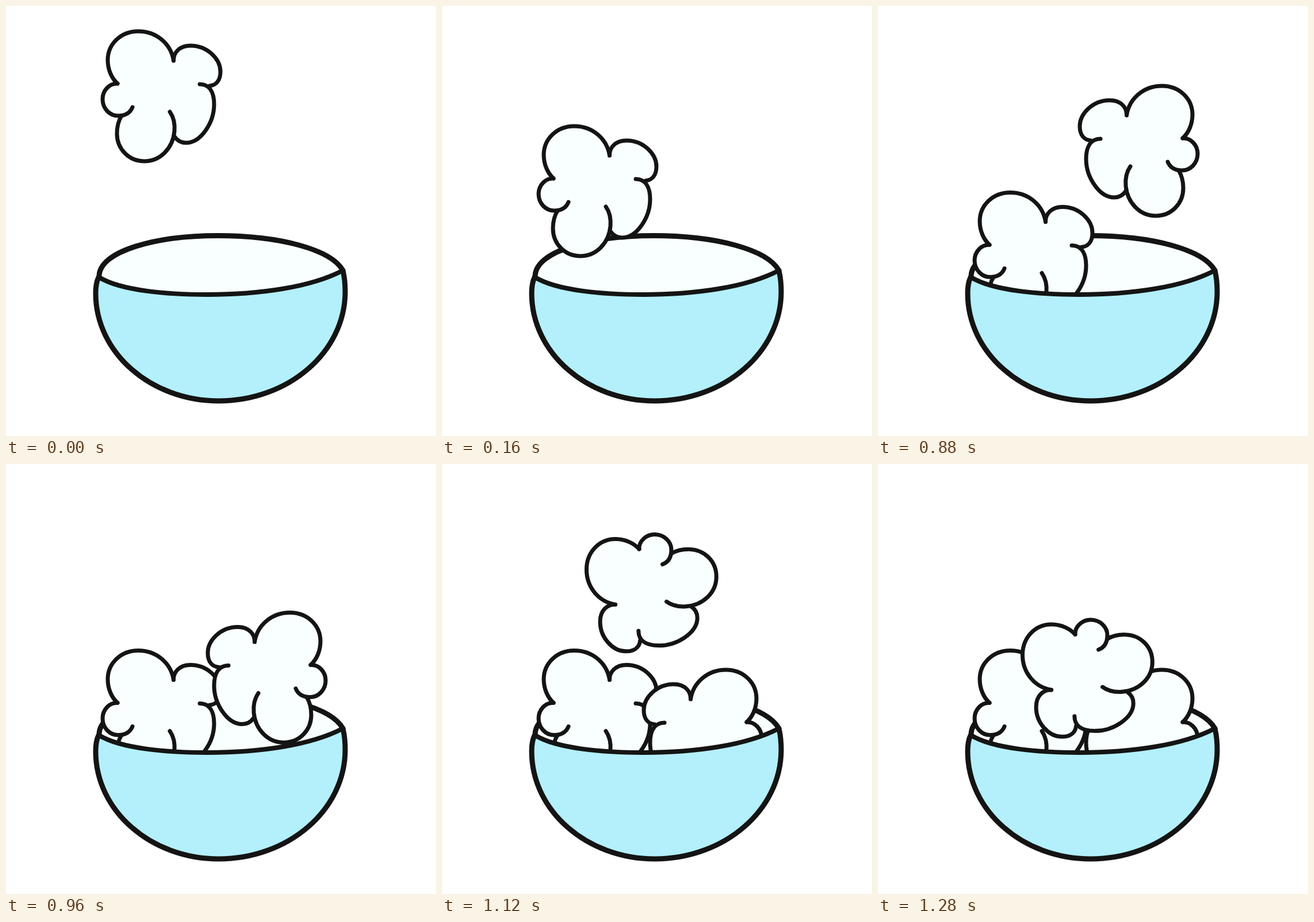
Write an HTML page with a canvas that moves like this. It is 748 px wide and 748 px high and loops after 1.6 s.

```html
<!DOCTYPE html>
<html lang="en">
<head>
<meta charset="utf-8">
<title>Filling a bowl</title>
<style>
html, body { margin: 0; width: 100%; height: 100%; overflow: hidden; background: #fff; }
canvas { display: block; width: 748px; height: 748px; }
</style>
</head>
<body>
<canvas id="stage" width="748" height="748"></canvas>
<script>
const ctx = document.getElementById('stage').getContext('2d');
const LINE = '#141414', PALE = '#f9fffe', BLUE = '#b3f0fb';
const LOOP = 1600, STEP = 80;

const lobes = [
  'M194 135C184 126 177 111 177 94C177 66 200 44 230 44C262 44 287 66 291.5 95',
  'M291.5 95C291 82 301 69 321 69C350 69 373 92 373 114C373 130 365 138 354 139',
  'M337 136C354 136 362 150 362 171C362 203 339 238 313 238C304 238 297 233 293 227',
  'M285 184C292 194 294 206 293 218C290 248 268 270 241 270C213 270 193 248 193 222C193 210 196 199 201 191',
  'M194 135C180 134 168 147 168 162C168 178 180 191 195 191C207 191 216 186 220 176'
].map(d => new Path2D(d));
const core = new Path2D('M194 135L291.5 95L354 139L337 136L293 227L285 184L201 191L220 176Z');

const backRim = 'M162 472C160 425 265 399.5 368 399.5C478 399.5 566 424 586 460';
const frontRim = 'C530 489.5 440 502 350 502C280 502 200 495 162 472';
const side = 'M161 472C157 480 156 490 156 500C156 603 252 687 370 687C491 687 590 602 590 497C590 482 589 472 586 460';
const opening = new Path2D(backRim + frontRim + 'Z');
const backLine = new Path2D(backRim);
const frontLine = new Path2D('M586 460' + frontRim);
const body = new Path2D(side + frontRim + 'Z');
const sideLine = new Path2D(side);

// Each puff: first step, held heights, and its placement as a matrix.
const puffs = [
  { start: 0, drop: [0, 54.5, 165, 280.5], place: y => [1, 0, 0, 1, 0, y] },
  { start: 11, drop: [95, 214.5, 314], place: y => [-1, 0, 0, 1, 724, y] },
  { start: 14, drop: [-47, 27.5, 101.5], place: y => [-0.015, 0.995, 1, 0.015, 210.9, y] }
];

function stroke(path, width, color = LINE) {
  ctx.lineWidth = width;
  ctx.strokeStyle = color;
  ctx.stroke(path);
}

function fill(path, color) {
  ctx.fillStyle = color;
  ctx.fill(path);
}

function drawPuff(puff, step) {
  const age = step - puff.start;
  if (age < 0) return;
  const y = puff.drop[Math.min(age, puff.drop.length - 1)];
  ctx.save();
  ctx.transform(...puff.place(y));
  lobes.forEach(p => fill(p, PALE));
  fill(core, PALE);
  stroke(core, 3, PALE);
  lobes.forEach(p => stroke(p, 7));
  ctx.restore();
}

function draw(time) {
  const step = Math.floor(time % LOOP / STEP);
  ctx.fillStyle = '#fff';
  ctx.fillRect(0, 0, 748, 748);
  ctx.lineCap = ctx.lineJoin = 'round';
  fill(opening, PALE);
  stroke(backLine, 9);
  puffs.forEach(p => drawPuff(p, step));
  fill(body, BLUE);
  stroke(sideLine, 9);
  stroke(frontLine, 8);
}

const begin = performance.now();
function tick() {
  draw(performance.now() - begin);
  requestAnimationFrame(tick);
}
tick();
</script>
</body>
</html>
```
